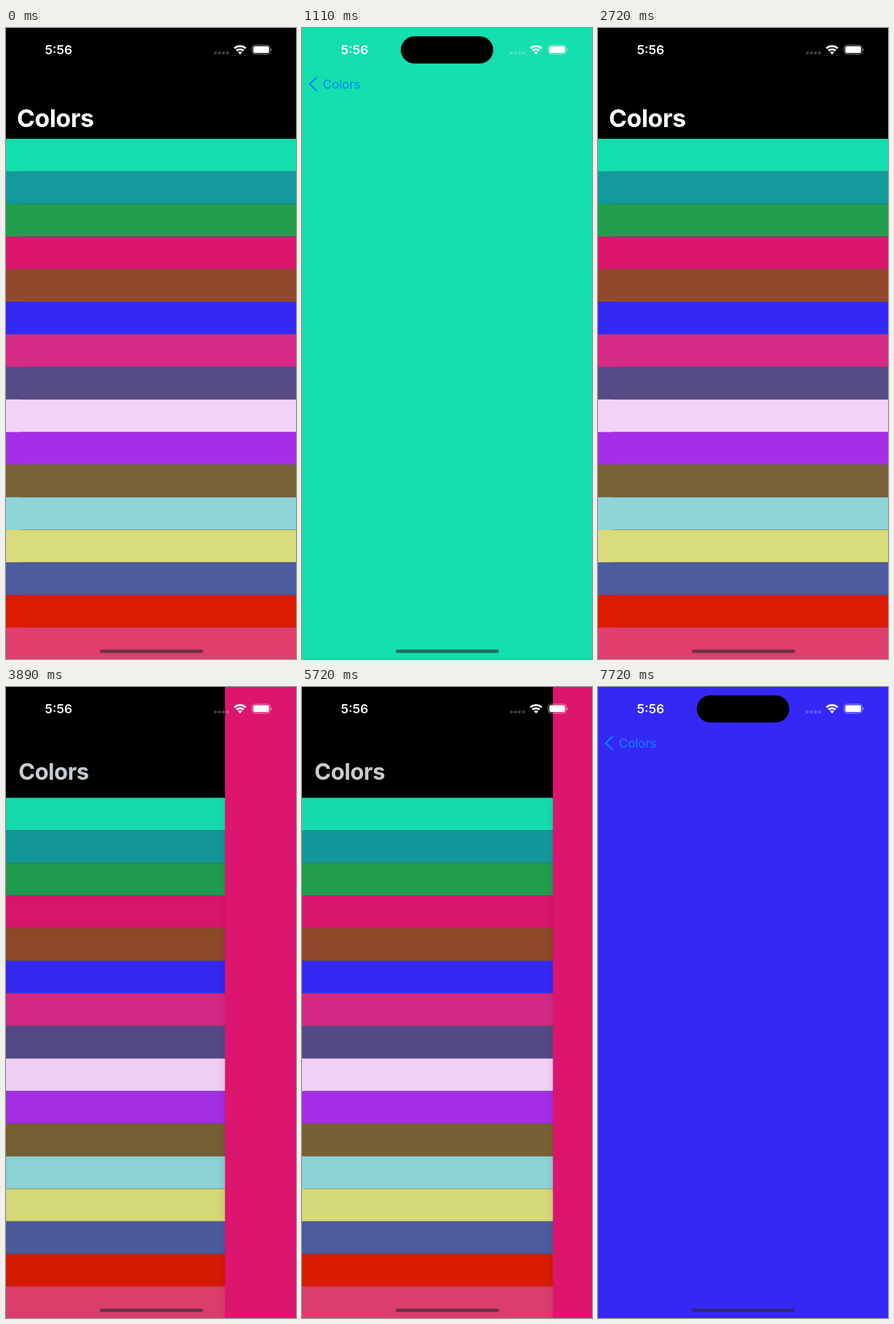
An HTML page for the animation above (8000 ms loop, 508 by 1102 pixels).

```html
<!DOCTYPE html>
<html lang="en">
<head>
<meta charset="utf-8">
<title>Colors</title>
<style>
  html, body { margin: 0; width: 100%; height: 100%; overflow: hidden; background: #000; }
  svg { display: block; width: 508px; height: 1102px; font-family: Inter, Roboto, sans-serif; }
</style>
</head>
<body>
<svg viewBox="0 0 508 1102">
  <rect width="508" height="1102"/>
  <g id="list"></g>
  <rect id="dim" width="508" height="1102" opacity="0"/>
  <defs>
    <linearGradient id="fade">
      <stop offset="0" stop-opacity="0"/>
      <stop offset="1" stop-opacity=".06"/>
    </linearGradient>
  </defs>
  <g id="page">
    <rect x="-11" width="11" height="1102" fill="url(#fade)"/>
    <rect id="fill" width="508" height="1102"/>
  </g>
  <g id="nav">
    <path id="chevron" d="M25 87 13.5 98 25 109" fill="none" stroke="#0a84ff" stroke-width="3" stroke-linecap="round" stroke-linejoin="round"/>
    <text id="back" fill="#0a84ff" font-size="21.5" letter-spacing="-.1">Colors</text>
    <text id="title" fill="#fff" font-size="43" font-weight="700" letter-spacing="-.5">Colors</text>
  </g>
  <rect x="173" y="14.5" width="162" height="47.5" rx="23.75"/>
  <g id="status" fill="#fff">
    <text x="68" y="46" font-size="22" font-weight="600">5:56</text>
    <g id="dots" opacity=".25"></g>
    <g id="wifi"></g>
    <rect x="431.2" y="29.8" width="31.6" height="16" rx="5.2" fill="none" stroke="#fff" stroke-width="1.3" opacity=".45"/>
    <rect x="433.2" y="31.8" width="27.6" height="12" rx="3.4"/>
    <path d="M464.3 35.4q1.8 .8 1.8 2.4t-1.8 2.4z" opacity=".5"/>
  </g>
  <rect x="164" y="1085.5" width="181" height="6" rx="3" fill="#282a32" opacity=".62"/>
</svg>
<script>
const W = 508, LOOP = 8000, FPS = 18, TOP = 193.5, ROW = 56.9;
const colors = ['#14dfae', '#129a9c', '#219f4f', '#dc156f', '#904a29', '#3528f6', '#d62a87', '#564a87',
  '#f4d3f8', '#a62ee8', '#786136', '#8fd6d8', '#d9dc7a', '#4d5c9f', '#db1b02', '#e03e6d'];

// Each visit: push start, back button touched, pop start (seconds)
const visits = [
  { color: colors[0], push: .56, touch: 2.05, pop: 2.176 },
  { color: colors[3], push: 3.837, touch: 5.325, pop: 5.53 },
  { color: colors[5], push: 7.185, touch: 99, pop: 99 }
];

const $ = id => document.getElementById(id);

function add(parent, tag, attrs) {
  const el = document.createElementNS('http://www.w3.org/2000/svg', tag);
  set(el, attrs);
  parent.appendChild(el);
  return el;
}

function set(el, attrs) {
  for (const k in attrs) el.setAttribute(k, attrs[k]);
}

colors.forEach((fill, i) => {
  add($('list'), 'rect', { y: TOP + i * ROW, width: W, height: ROW + .5, fill });
});
for (let i = 1; i < colors.length; i++) {
  add($('list'), 'rect', { x: 26, y: TOP + i * ROW - .5, width: W, height: .9, fill: '#545458', opacity: .6 });
}

for (let i = 0; i < 4; i++) {
  add($('dots'), 'rect', { x: 364.4 + i * 7, y: 41.2, width: 4.8, height: 4.8, rx: 1.2 });
}

// Wi-Fi bands between two radii around the lower tip
function band(outer, inner) {
  const a = .75, at = (r, s) => `${410 + s * r * Math.sin(a)} ${46.2 - r * Math.cos(a)}`;
  add($('wifi'), 'path', {
    d: `M${at(outer, -1)}A${outer} ${outer} 0 0 1 ${at(outer, 1)}L${at(inner, 1)}A${inner} ${inner} 0 0 0 ${at(inner, -1)}Z`
  });
}
band(16.3, 12.8);
band(10.8, 7.3);
band(5.3, .1);

// Critically damped spring, 0 to 1
function spring(t) {
  if (t <= 0) return 0;
  const u = 18.26 * t;
  return u > 9.8 ? 1 : 1 - Math.exp(-u) * (1 + u);
}

const mix = (a, b, k) => a + (b - a) * k;

function draw(ms) {
  const t = Math.floor((ms + 5) * FPS / 1000) / FPS;
  const v = visits.filter(o => t >= o.push).pop() || visits[0];
  const shown = d => spring(t - v.push - d) * (1 - spring(t - v.pop - d));
  const p = shown(0), q = 1 - shown(.012);
  const x = W * (1 - p);

  set($('list'), { transform: `translate(${-.3 * W * p} 0)` });
  set($('dim'), { opacity: .1 * p });
  set($('page'), { transform: `translate(${x} 0)`, visibility: p > 0 ? 'visible' : 'hidden' });
  set($('fill'), { fill: v.color });

  const press = t >= v.touch ? .3 : 1;
  const left = mix(36.6, 19, q), base = mix(105.5, 173, q), size = mix(.474, 1, q);
  const place = s => `translate(${left} ${base}) scale(${s})`;
  set($('title'), { transform: place(size), opacity: Math.pow(q, 1.35) });
  set($('back'), { transform: place(size / .474), opacity: (1 - q) * press });
  set($('chevron'), { opacity: Math.max(0, 1 - q / .4) * press });
}

const start = performance.now();
function tick() {
  draw((performance.now() - start) % LOOP);
  requestAnimationFrame(tick);
}
tick();
</script>
</body>
</html>
```
